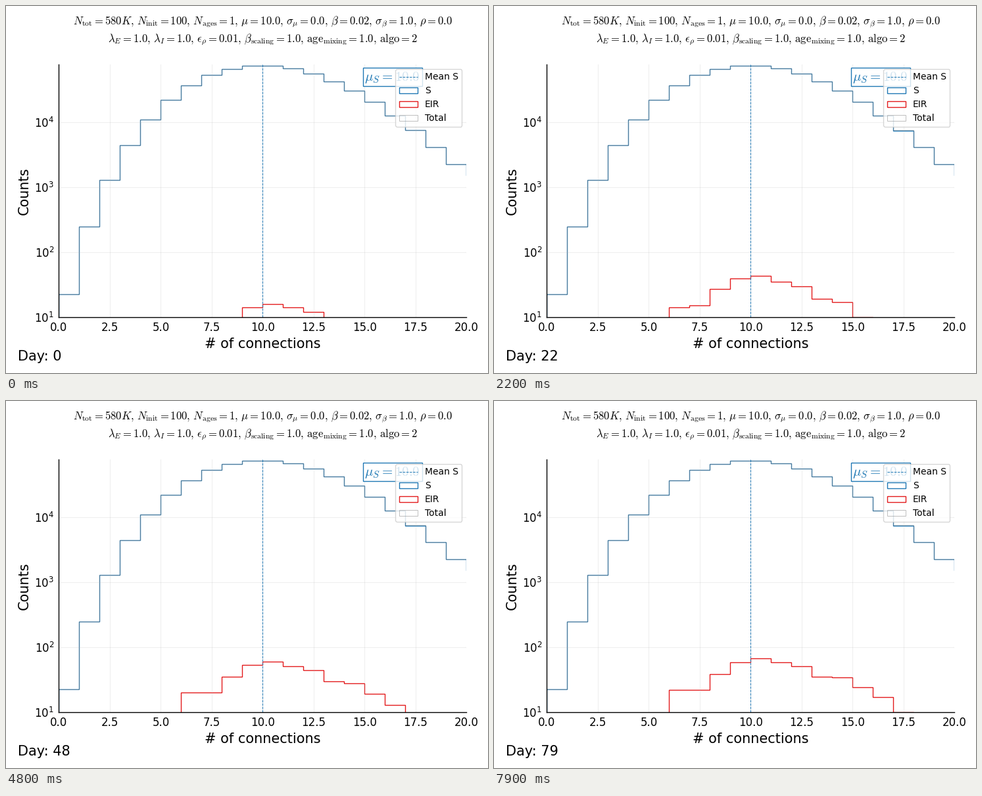
Write a matplotlib script that moves like this. It is 733 px wide and 559 px high and loops after 8000 ms.

```python
import math

import matplotlib.pyplot as plt
import numpy as np
from matplotlib.animation import FuncAnimation
from matplotlib.patches import Patch, Rectangle

W, H, DPI = 733, 559, 100
LEFT, BOTTOM, AX_W, AX_H = 80.4, 473.9, 620, 385
DAYS = 80
PEOPLE, MEAN = 580e3, 10
BLUE, RED, GRAY = "#1f78b4", "#e31a1c", "gray"

plt.rcParams.update({"font.family": "DejaVu Sans", "mathtext.fontset": "cm"})

# All people per number of connections: Poisson with slightly bent tails
bins = np.arange(21)
total = np.array([PEOPLE * math.exp(-MEAN) * MEAN**k / math.factorial(k)
                  for k in range(21)])
total *= 1 - 0.154 * np.exp(-bins) + 0.4 * np.exp(2.5 * (bins - 20))

# Infected people in bins 6..17: first share, final level and pace of growth
hit = np.arange(6, 18)
final = np.array([22, 22, 38, 58, 67, 58, 51, 35, 34, 24, 17, 10])
first = 0.233 * np.clip((17 - hit) / 4, 0, 1)
pace = 0.66 + 0.07 * abs(hit - 8)


def infected(day):
    growth = np.sin(np.pi / 2 * (day / (DAYS - 1)) ** pace)
    eir = np.zeros(len(bins))
    eir[hit] = np.round(final * (first + (1 - first) * growth))
    return eir


fig = plt.figure(figsize=(W / DPI, H / DPI), dpi=DPI, facecolor="white")


def label(x, y, text, size, **kw):
    """Text with its baseline at pixel (x, y), y counted from the top."""
    return fig.text(x / W, 1 - y / H, text, size=size, va="baseline", **kw)


def formula(*terms):
    return "$" + r" , \, ".join(terms) + "$"


label(391, 29, formula(
    r"N_\mathrm{tot} = 580K", r"N_\mathrm{init} = 100", r"N_\mathrm{ages} = 1",
    r"\mu = 10.0", r"\sigma_\mu = 0.0", r"\beta = 0.02",
    r"\sigma_\beta = 1.0", r"\rho = 0.0"), 12, ha="center")
label(391, 55, formula(
    r"\lambda_E = 1.0", r"\lambda_I = 1.0", r"\epsilon_\rho = 0.01",
    r"\beta_\mathrm{scaling} = 1.0", r"\mathrm{age}_\mathrm{mixing} = 1.0",
    r"\mathrm{algo} = 2"), 12, ha="center")
day_text = label(17.6, 540, "Day: 0", 15)

ax = fig.add_axes([LEFT / W, 1 - BOTTOM / H, AX_W / W, AX_H / H])
ax.set_yscale("log")
edges = np.arange(len(bins) + 1)
total_style = dict(lw=0.5, alpha=0.7)
s_steps = ax.stairs(total - infected(0), edges, color=BLUE, lw=1)
eir_steps = ax.stairs(infected(0), edges, color=RED, lw=1)
ax.stairs(total, edges, color=GRAY, **total_style)
mean_line = ax.axvline(MEAN, color=BLUE, lw=0.7, ls="--")

ax.set_xlim(0, 20)
ax.set_ylim(10, 76650)
ax.set_xlabel("# of connections", size=15)
ax.set_ylabel("Counts", size=15)
ax.tick_params(which="both", length=0)
ax.tick_params(labelsize=12, pad=5.25)
ax.grid(True, which="major", lw=0.8, alpha=0.2)
ax.spines[["top", "right"]].set_visible(False)
ax.spines[["left", "bottom"]].set_linewidth(1)

# Mean value in its frame, partly under the legend
ax.add_patch(Rectangle((543, H - 122), 90, 28, transform=None, fc="white",
                       ec=BLUE, lw=1, zorder=3, clip_on=False))
ax.text(545, H - 114, r"$\mu_S = 10.0$", transform=None, size=15, color=BLUE,
        va="baseline", zorder=4)

ax.legend(
    [mean_line,
     Patch(fill=False, ec=BLUE, lw=1),
     Patch(fill=False, ec=RED, lw=1),
     Patch(fill=False, ec=GRAY, **total_style)],
    ["Mean S", "S", "EIR", "Total"], loc="upper right", fontsize=10)


def update(day):
    eir = infected(day)
    s_steps.set_data(values=total - eir)
    eir_steps.set_data(values=eir)
    day_text.set_text(f"Day: {day}")
    return s_steps, eir_steps, day_text


anim = FuncAnimation(fig, update, frames=DAYS, interval=100, repeat=True,
                     repeat_delay=0, blit=False)
plt.show()
```
